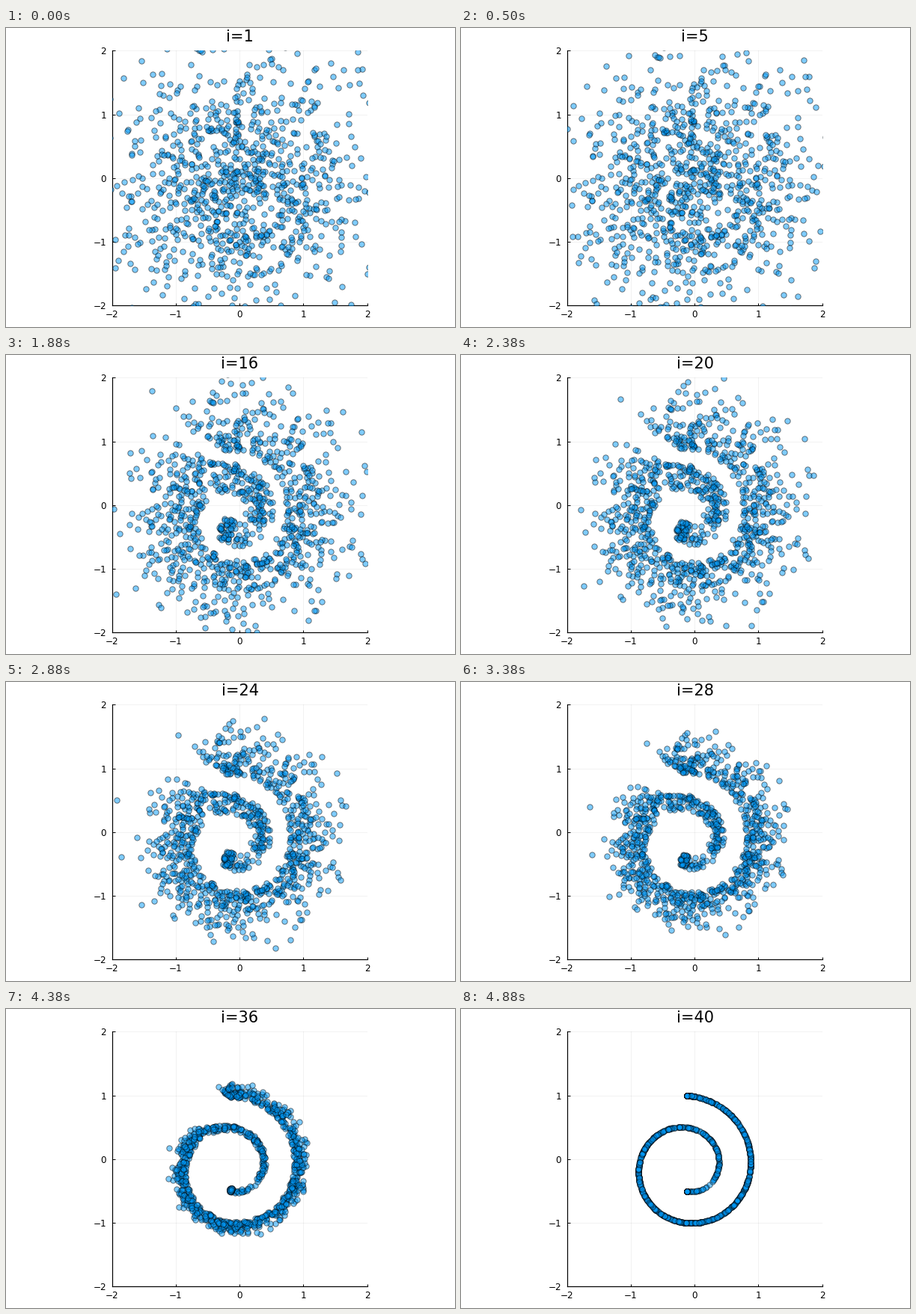
A matplotlib script that plays this animation: 600 by 400 pixels, repeating every 6.26 s.

```python
import numpy as np
import matplotlib.pyplot as plt
from matplotlib.animation import FuncAnimation

W, H, DPI = 600, 400, 100
STEPS, STEP_MS = 40, 125
LOOP_MS, TICK_MS = 6260, 20
COUNT = 1000
PX = 72 / DPI
BLUE = (0, 154 / 255, 250 / 255)

plt.rcParams["font.family"] = "DejaVu Sans"

# Archimedean spiral, one and a half turns
turn = np.linspace(1.5 * np.pi, 4.5 * np.pi, 1500)[:, None]
spiral = turn / (4 * np.pi) * np.hstack([np.cos(turn), np.sin(turn)]) - 0.125


def project(points):
    """Nearest spiral point of each point."""
    gap = points[:, None, :] - spiral[None, :, :]
    return spiral[(gap ** 2).sum(axis=2).argmin(axis=1)]


# Gaussian noise plus a few far stragglers, each sliding to its nearest spiral point
stragglers = [(-3.5, 1.13), (-2.16, 2.29), (1.63, 1.70), (-2.68, -1.88),
              (1.0, -3.07), (-0.23, 2.71), (0.54, 2.65), (2.57, 0.22)]
rng = np.random.default_rng(7)
start = np.vstack([stragglers, rng.normal(size=(COUNT - len(stragglers), 2))])
end = project(start)

fig = plt.figure(figsize=(W / DPI, H / DPI), dpi=DPI, facecolor="white")
ax = fig.add_axes([141.7 / W, 28.6 / H, 341 / W, 341 / H])
ax.set(xlim=(-2, 2), ylim=(-2, 2), xticks=range(-2, 3), yticks=range(-2, 3))
ax.set_axisbelow(True)
ax.grid(color="black", alpha=0.05, linewidth=PX)
ax.spines[["top", "right"]].set_visible(False)
ax.spines[["left", "bottom"]].set_linewidth(1.2 * PX)
ax.tick_params(direction="in", length=3.5 * PX, width=PX, labelsize=12 * PX)
ax.tick_params(axis="x", pad=6 * PX)
ax.tick_params(axis="y", pad=7.5 * PX)

dots = ax.scatter(*start.T, s=(7.4 * PX) ** 2, facecolors=[(*BLUE, 0.5)],
                  edgecolors=[(0, 0, 0, 0.5)], linewidths=PX, zorder=3)
title = fig.text(312.5 / W, 382 / H, "", fontsize=15, ha="center", va="baseline")


def draw(frame):
    step = min(STEPS, 1 + (frame * TICK_MS + TICK_MS // 2) // STEP_MS)
    left = (STEPS - step) / (STEPS - 1)
    dots.set_offsets(end + (start - end) * left)
    title.set_text(f"i={step}")
    return dots, title


anim = FuncAnimation(fig, draw, frames=LOOP_MS // TICK_MS, interval=TICK_MS,
                     init_func=lambda: draw(0), repeat=True, repeat_delay=0)
plt.show()
```
